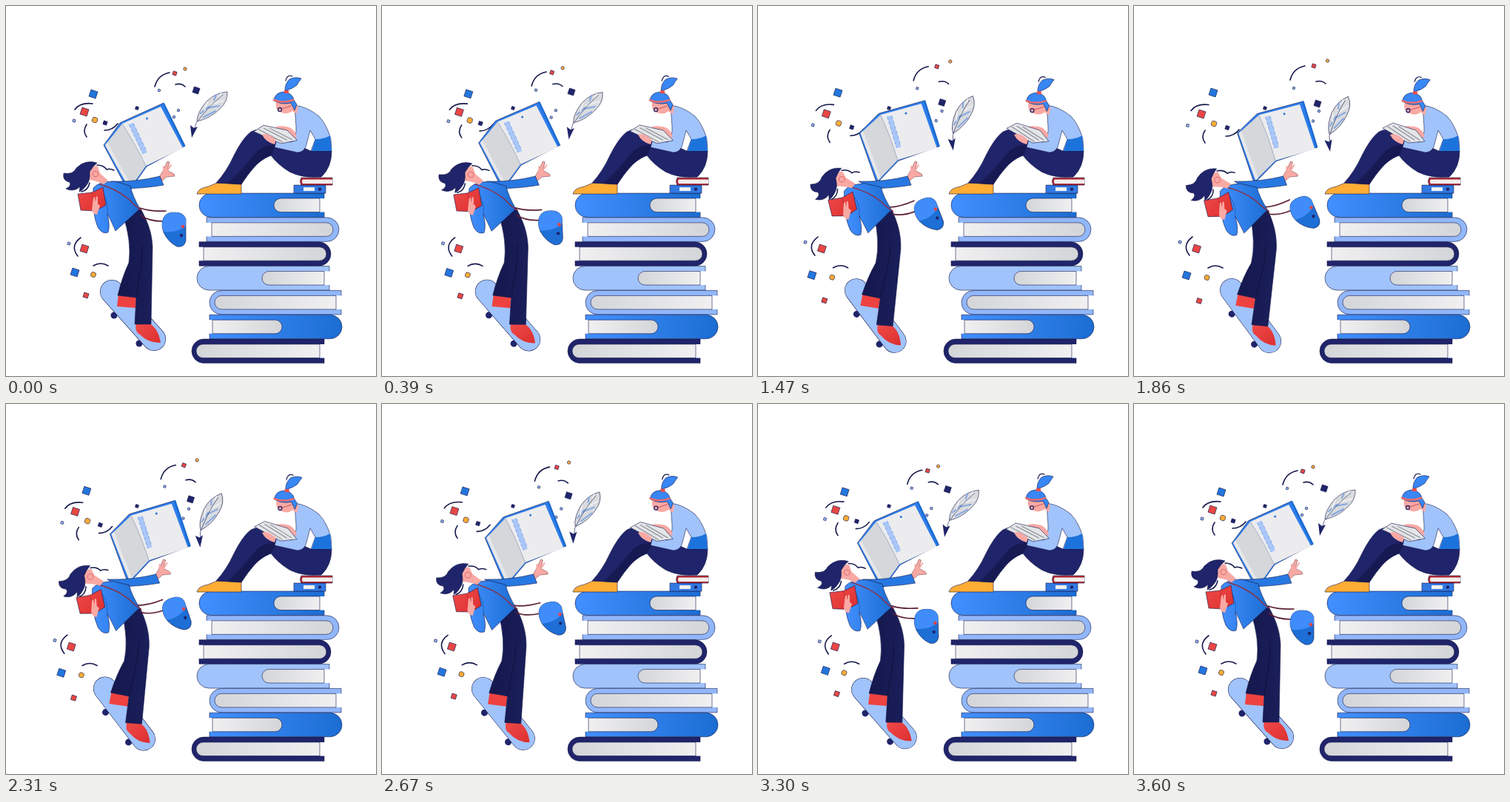
Write an HTML page that moves like this. It is 500 by 500 pixels and loops after 3630 ms.

```html
<!DOCTYPE html>
<html lang="en">
<head>
<meta charset="utf-8">
<title>Reading and riding</title>
<style>
html, body { margin: 0; width: 100%; height: 100%; overflow: hidden; background: #fff; }
svg { display: block; width: 100vw; height: 100vh; }
.line { fill: none; stroke-linecap: round; stroke-linejoin: round; }
.ink { stroke: #15184b; stroke-width: .6; }
.skin { fill: #f8a9a4; }
.navy { fill: #20246a; }
</style>
</head>
<body>
<svg viewBox="0 0 500 500">
  <defs>
    <linearGradient id="blue"><stop stop-color="#428fff"/><stop offset="1" stop-color="#1b6dd2"/></linearGradient>
    <linearGradient id="paper"><stop stop-color="#d3d5d8"/><stop offset="1" stop-color="#f0f0f1"/></linearGradient>
    <linearGradient id="paperBack"><stop stop-color="#f0f0f1"/><stop offset="1" stop-color="#d3d5d8"/></linearGradient>
    <linearGradient id="jeans"><stop stop-color="#15184d"/><stop offset="1" stop-color="#1a1e5a"/></linearGradient>
    <linearGradient id="red" x2="1" y2="1"><stop stop-color="#f04a49"/><stop offset="1" stop-color="#dc2f2f"/></linearGradient>
  </defs>

  <g id="stack"></g>

  <g id="girl">
    <path d="M389 242H432V253H389Z" fill="#3279e2" class="ink"/>
    <path d="M402 245H417V250H402Z" fill="#f0f0f1"/>
    <circle cx="424" cy="247.500" r="2.200" class="navy"/>
    <path d="M399 232H441V242H399Q396 237 399 232Z" fill="#b52b32" class="ink"/>
    <path d="M401 234.500H441V240H401Q399 237 401 234.500Z" fill="#f1eeee"/>
    <path d="M258 254Q260 246 273 244L285 239L318 240V254Z" fill="#ffad35" class="ink"/>
    <path d="M284 239Q298 224 308 202Q320 178 331 170Q340 165 350 168L412 196H440Q440 218 426 231Q400 233 383 224Q368 215 358 202Q345 207 336 217Q327 227 318 241Z" class="navy ink"/>
    <path d="M299 240Q319 222 335 201Q346 187 366 187L358 202Q345 207 336 217Q327 227 318 241Z" fill="#171a52"/>
    <path d="M390 134Q407 136 423 149Q434 161 439 180L440 196H412L418 180L411 168L406 187Q404 197 394 198L363 191L366 180L386 184Q393 176 392 163Z" fill="#a0c3fb" class="ink"/>
    <path d="M418 180Q430 180 438 175L440 196H413Z" fill="#1d73dc"/>
    <path d="M364 163Q374 161 383 164Q391 168 393 177L386 178Z" class="skin"/>
    <g id="novel">
      <path d="M336 165L350 158L381 168L393 183L371 185Z" fill="#e3e5e7" class="ink"/>
      <path d="M343 163L373 183M350 162L379 181M358 163L386 181" class="line" stroke="#878b94" stroke-width="1.100"/>
    </g>
    <path d="M346 174Q353 170 365 181L363 187Q351 184 346 174Z" class="skin"/>
    <g id="girlHead">
      <path d="M365 130Q363 139 370 143Q380 148 387 142L393 146L395 136L387 130Z" class="skin"/>
      <path d="M362 128Q363 117 375 116Q387 117 389 127L393 133L390 141L385 131Q373 134 362 128Z" fill="#3887f4" class="ink"/>
      <path d="M362 127Q373 132 388 127" class="line" stroke="#ed6a6b" stroke-width="2.500"/>
      <path d="M377 114Q377 105 383 99Q391 95 399 98Q396 102 393 107Q387 112 379 114Z" fill="#3887f4" class="ink"/>
      <path d="M378 101Q380 92 387 95" class="line" stroke="#15184b" stroke-width="1.200"/>
      <path d="M376 114H382V118H376Z" fill="#ee4d4c"/>
      <circle cx="370" cy="140" r="2.500" fill="none" stroke="#20246a" stroke-width="1.300"/>
      <path d="M373 139L385 135" class="line" stroke="#c33942" stroke-width=".8"/>
    </g>
  </g>

  <g id="confetti"></g>

  <g id="quill">
    <path d="M258 156Q258 144 271 129Q283 117 299 116Q300 129 289 139Q276 152 258 156Z" fill="#d9dbde" class="ink"/>
    <path d="M263 145L274 136M267 150L283 142M271 138L288 135M281 127L284 120" class="line" stroke="#86a8e0" stroke-width="2"/>
    <path d="M268 141L272 130M277 133L294 128M288 123L291 118" class="line" stroke="#f4f4f5" stroke-width="1.500"/>
    <path d="M293 120Q275 134 257 158L253 172" class="line" stroke="#4d5278" stroke-width=".8"/>
    <path d="M249 161L254 165L259 163L251 178Z" class="navy"/>
  </g>

  <g id="tome">
    <path d="M132 188L154 158L158 156L213 131L242 189L190 217L169 247L164 248Z" fill="#2f7deb" class="ink"/>
    <path d="M134 188L157 159Q176 188 189 216L167 247Q151 219 134 188Z" fill="#d5d7da"/>
    <path d="M134 188L137 184Q153 214 170 243L167 247Q151 219 134 188Z" fill="#e6e7e9"/>
    <path d="M157 159L209 136L239 192L189 216Q176 188 157 159Z" fill="#ececee"/>
    <path d="M157 159Q176 188 189 216" class="line" stroke="#a4a9b3" stroke-width=".7"/>
    <path d="M169 159L188 199" stroke="#a9c6f8" stroke-width="6"/>
    <path d="M166 160L185 200M172 158L190 196" stroke="#6f9fee" stroke-width=".8" stroke-dasharray="5 2"/>
    <circle cx="190.500" cy="152" r="1.500" fill="#2f74dc"/>
    <path d="M213 132L241 189" class="line" stroke="#1b6dd2" stroke-width="2.500"/>
  </g>

  <g id="legs">
    <circle cx="146" cy="418" r="4.500" class="navy"/>
    <circle cx="180" cy="456" r="4.500" class="navy"/>
    <path d="M143 386L200 450" class="line" stroke="#15184b" stroke-width="32"/>
    <path d="M143 386L200 450" class="line" stroke="#a0c3fb" stroke-width="31"/>
    <path d="M152 389L176 393L175 408L150 406Z" fill="#ee4240"/>
    <path d="M176 428L194 429Q206 436 209 455Q193 456 181 444Q173 440 176 428Z" fill="url(#red)"/>
    <path d="M158 282L182 274C190 289 197 304 198 325L196 430L174 430L176 394L151 391Q157 366 166 347Q170 318 158 282Z" fill="url(#jeans)" class="ink"/>
    <path d="M184 322Q184 349 180 367L176 394" class="line" stroke="#11143f" stroke-width="1.200"/>
  </g>

  <g id="bag">
    <path d="M181 273Q195 278 216 277M182 283Q193 291 213 291" class="line" stroke="#5c1e35" stroke-width="1.700"/>
    <path d="M213 286Q217 278 229 279Q240 279 243 288L243 317Q241 327 231 325Q219 319 213 306Q209 295 213 286Z" fill="#1d6fd6" class="ink"/>
    <path d="M213 286Q217 278 229 279Q240 279 243 288L243 297Q232 307 213 305Q209 295 213 286Z" fill="#3f8cfa"/>
    <circle cx="239" cy="298" r="2.200" fill="#ee4240"/>
    <circle cx="237" cy="310" r="2.200" class="navy"/>
  </g>

  <g id="arm">
    <path d="M206 233L213 221L218 210L221 211L218 222L227 227L228 230L217 231L210 237Z" class="skin" stroke="#6b3846" stroke-width=".5"/>
    <path d="M213 223L213 217M217 224L223 215" class="line" stroke="#f8a9a4" stroke-width="2"/>
    <path d="M142 237Q176 238 208 230L213 242Q190 246 160 247Z" fill="#2878e2" class="ink"/>
  </g>

  <g id="torso">
    <path d="M118 246Q125 237 146 237L168 243Q171 257 181 274L148 304Q142 290 137 281Q141 296 138 306Q130 309 124 299Q116 280 118 246Z" fill="url(#blue)" class="ink"/>
    <path d="M137 281Q139 267 132 255" class="line" stroke="#1959ad" stroke-width=".8"/>
    <path d="M127 241Q151 248 167 262Q176 272 183 276" class="line" stroke="#8d2e43" stroke-width="1.400"/>
  </g>

  <g id="boyHead">
    <path d="M113 223Q118 214 124 217L127 226L138 236L132 241Q122 236 113 235Q109 229 113 223Z" class="skin"/>
    <path d="M78 226Q91 228 95 219Q107 207 123 212Q117 217 113 224Q114 236 109 242Q104 249 99 251L100 244Q92 252 81 247Q89 243 86 238Q76 236 78 226Z" class="navy ink"/>
    <circle cx="121" cy="227" r="3.800" fill="none" stroke="#d95e64" stroke-width=".8"/>
    <path d="M123 215Q132 215 136 221Q140 219 146 222M102 251Q111 249 113 239" class="line" stroke="#15184b" stroke-width="1.500"/>
  </g>

  <g id="redBook">
    <path d="M97 254L116 252L131 245L135 269L121 277L101 276Z" fill="url(#red)" class="ink"/>
    <path d="M116 252L121 276" class="line" stroke="#b72731" stroke-width=".7"/>
    <path d="M116 275L118 259L120 258L121 265L122 257L124 258L124 267L127 270L123 282Q117 281 116 275Z" class="skin"/>
  </g>
</svg>
<script>
const LOOP = 3630;
const NS = 'http://www.w3.org/2000/svg';
const $ = id => document.getElementById(id);

function add(parent, tag, attrs) {
  const el = document.createElementNS(NS, tag);
  for (const key in attrs) el.setAttribute(key, attrs[key]);
  return parent.appendChild(el);
}

// Horizontal block with a fully rounded end on one side.
function slab(x1, x2, y1, y2, roundLeft) {
  const r = (y2 - y1) / 2;
  return roundLeft
    ? `M${x2} ${y1}H${x1 + r}A${r} ${r} 0 0 0 ${x1 + r} ${y2}H${x2}Z`
    : `M${x1} ${y1}H${x2 - r}A${r} ${r} 0 0 1 ${x2 - r} ${y2}H${x1}Z`;
}

// cover left, cover right, pages left, pages right, rounded left, fill
[
  [261, 430, 362, 424, true, 'url(#blue)'],
  [271, 450, 278, 442, false, '#91b7fa'],
  [261, 439, 267, 433, false, '#20246a'],
  [258, 437, 346, 430, true, '#a0c3fb'],
  [275, 453, 282, 446, true, '#91b7fa'],
  [275, 454, 279, 373, false, 'url(#blue)'],
  [251, 430, 257, 424, true, '#20246a']
].forEach(([x1, x2, p1, p2, left, fill], i) => {
  const y = 253 + i * 32.85, stack = $('stack');
  add(stack, 'path', { d: slab(x1, x2, y, y + 32.5, left), fill, class: 'ink' });
  // the open side between the two cover boards
  if (left) add(stack, 'rect', { x: p2, y: y + 7, width: x2 - p2 + 1, height: 18.5, fill: '#fff' });
  else add(stack, 'rect', { x: x1 - 1, y: y + 7, width: p1 - x1 + 1, height: 18.5, fill: '#fff' });
  add(stack, 'path', {
    d: slab(p1, p2, y + 7, y + 25.5, left), class: 'ink',
    fill: left ? 'url(#paper)' : 'url(#paperBack)'
  });
});

const BLUE = '#2376dd', RED = '#e94743', GOLD = '#ffad35', NAVY = '#20246a', PALE = '#91b7fa';
const bits = [];

// colour, x, y, travel x, travel y, size
[
  [BLUE, 118, 119, -11, -2, 9.5], [RED, 106, 143, -15, 3, 9.5],
  [GOLD, 120, 154, -12, 5, 7], [NAVY, 134, 158, -8, 6.5, 5],
  [PALE, 92, 155, -19.5, 6.5, 3.5], [RED, 228, 91, 15, -10, 5],
  [GOLD, 242, 85, 19.5, -11, 4], [NAVY, 257, 114, -9, 18, 8],
  [PALE, 207, 114, 9, -3, 3], [PALE, 227, 150, 15, 5.5, 3],
  [PALE, 233, 141, 17, 1, 3], [NAVY, 177, 138, 0, 0, 4],
  [PALE, 85, 321, -23, -2, 3.5], [RED, 106, 328, -21.5, 0, 9.5],
  [BLUE, 93, 360, -22, 4, 9.5], [GOLD, 118, 363, -19.5, 4, 6.5],
  [RED, 108, 391, -20, 7.5, 6.5]
].forEach(([fill, x, y, dx, dy, size]) => {
  const g = add($('confetti'), 'g', {});
  add(g, 'rect', {
    x: x - size / 2, y: y - size / 2, width: size, height: size,
    rx: fill === GOLD ? size / 3 : 0, fill, class: 'ink', transform: `rotate(18 ${x} ${y})`
  });
  bits.push([g, dx, dy]);
});

[
  ['M93 140Q100 130 117 132', -16, 1.5],
  ['M109 177Q103 169 109 160', -13, 8],
  ['M133 168Q144 168 151 159', -9, 8],
  ['M201 109Q205 93 221 90', 10, -9],
  ['M229 106Q237 104 242 109', 17, -4],
  ['M97 338Q86 324 101 313', -22, -1],
  ['M118 351Q128 345 138 351', -18, 3]
].forEach(([d, dx, dy]) => {
  const el = add($('confetti'), 'path', { d, class: 'line', stroke: '#15184b', 'stroke-width': 1.6 });
  bits.push([el, dx, dy]);
});

function pose(id, dx, dy, angle, px, py) {
  $(id).setAttribute('transform', `translate(${dx} ${dy}) rotate(${angle} ${px} ${py})`);
}

function draw(now) {
  const a = (now % LOOP) / LOOP * 2 * Math.PI;
  const p = (1 - Math.cos(a)) / 2, s = Math.sin(a);
  for (const [el, dx, dy] of bits) el.setAttribute('transform', `translate(${dx * p} ${dy * p})`);
  pose('quill', p, 12.5 * p, -19.6 * p, 275.5, 143.5);
  pose('tome', 7.8 * p - 3.4 * s, -7.2 * p - 1.9 * s, 9.5 * p, 188, 180);
  pose('legs', -p, p, 5.2 * p, 170, 275);
  pose('bag', -4 * p, -2 * p, -23 * p, 183, 275);
  pose('arm', -6.5 * p, 0, 0, 142, 240);
  pose('torso', -.5 * p, 2 * p, -2.5 * p, 170, 275);
  pose('boyHead', -6.5 * p, 5 * p, -11.5 * p, 135, 238);
  pose('redBook', -2 * p, 7.5 * p, -4 * p, 118, 262);
  pose('girlHead', .5 * p, 1.5 * p, p, 385, 140);
  pose('novel', 0, 0, -6 * (1 - p), 380, 178);
}

const start = performance.now();
function tick() {
  draw(performance.now() - start);
  requestAnimationFrame(tick);
}
tick();
</script>
</body>
</html>
```
